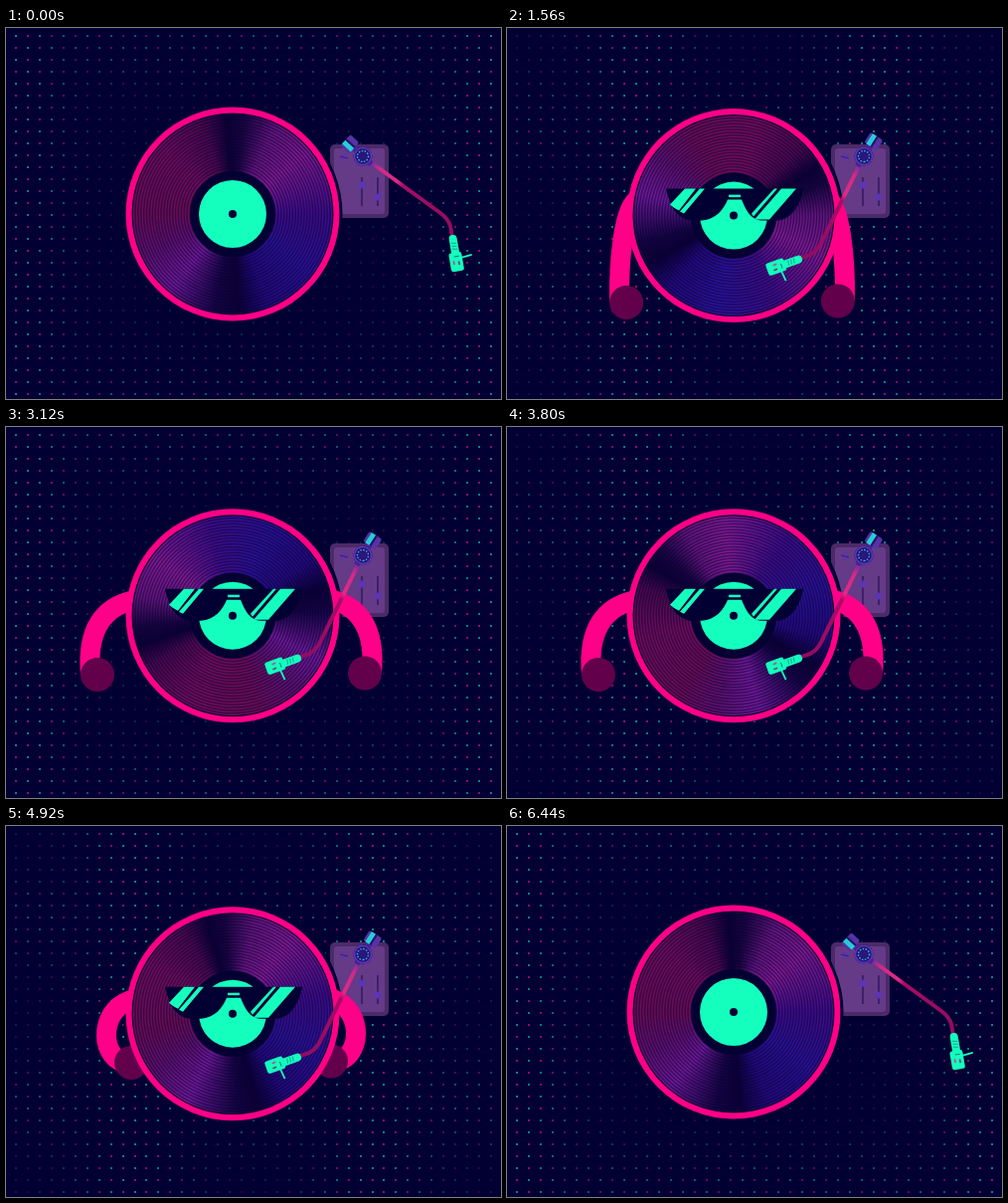
These frames come from a looping animation (498x373 px, 6.48 s). An HTML page with a canvas:

```html
<!DOCTYPE html>
<html lang="en">
<head>
<meta charset="utf-8">
<title>Dancing record</title>
<style>
html, body { margin: 0; width: 100%; height: 100%; overflow: hidden; background: #020033; }
canvas { display: block; width: 498px; height: 373px; }
</style>
</head>
<body>
<canvas id="stage" width="498" height="373"></canvas>
<script>
const c = document.getElementById('stage').getContext('2d');
const LOOP = 6480, TAU = Math.PI * 2;
const NAVY = '#020033', PINK = '#ff0086', MINT = '#14ffbe';
const CX = 228, CY = 187;

const clamp = x => Math.max(0, Math.min(1, x));
const smooth = x => x * x * (3 - 2 * x);
const ramp = (t, a, b) => smooth(clamp((t - a) / (b - a)));
const bell = (x, s) => Math.exp(-x * x / (2 * s * s));

function disc(x, y, r, fill) {
  c.beginPath();
  c.arc(x, y, r, 0, TAU);
  c.fillStyle = fill;
  c.fill();
}
function ring(x, y, r, width, color) {
  c.beginPath();
  c.arc(x, y, r, 0, TAU);
  c.lineWidth = width;
  c.strokeStyle = color;
  c.stroke();
}
function box(x, y, w, h, r, fill) {
  c.beginPath();
  c.roundRect(x, y, w, h, r);
  c.fillStyle = fill;
  c.fill();
}
function line(x1, y1, x2, y2, width, color) {
  c.beginPath();
  c.moveTo(x1, y1);
  c.lineTo(x2, y2);
  c.lineWidth = width;
  c.strokeStyle = color;
  c.stroke();
}
function shape(path, fill) {
  c.fillStyle = fill;
  c.fill(new Path2D(path));
}

// Vinyl sheen, clockwise from the right
const sheen = c.createConicGradient(0, 0, 0);
[[0, '#4a10a0'], [.1, '#3216b0'], [.19, '#280d92'], [.24, '#0c0038'], [.28, '#18054a'],
 [.36, '#8a20b4'], [.43, '#74157f'], [.5, '#84105f'], [.62, '#8a1066'], [.7, '#5a0a55'],
 [.74, '#0c0035'], [.77, '#1c0645'], [.82, '#7a1a90'], [.89, '#a021ac'], [1, '#4a10a0']
].forEach(s => sheen.addColorStop(...s));

// Pose: hand x, y, elbow control x, y, shoulder control x, record drop
const HIDDEN = [170, 240, 150, 215, 150, 0];
const DOWN = [134, 292, 128, 250, 130, 1];
const RISEN = [95, 247, 83, 203, 97, 2.7];
const OUT = [92, 249, 81, 205, 97, 2.7];
const BENT = [126, 238, 92, 230, 95, 1.7];
const KEYS = [[0, HIDDEN], [1200, HIDDEN], [1400, DOWN], [1800, RISEN], [2200, RISEN],
  [2500, OUT], [4600, OUT], [4880, BENT], [5000, BENT], [5360, OUT], [5800, OUT],
  [6160, DOWN], [6400, HIDDEN], [LOOP, HIDDEN]];

function poseAt(t) {
  const i = KEYS.findIndex(k => k[0] > t);
  const [t0, a] = KEYS[i - 1], [t1, b] = KEYS[i];
  const u = ramp(t, t0, t1);
  return a.map((v, n) => v + (b[n] - v) * u);
}

// Light bands rush from the edges to the centre, then drift back
function bandAt(t) {
  if (t < 960 || t > 6000) return 1;
  const u = (t - 960) / 560 % 1;
  return u < .22 ? Math.pow(1 - u / .22, 1.7) : ramp(u, .22, .92);
}

function dots(t) {
  const p = bandAt(t);
  for (let i = 0; i < 41; i++) {
    for (let j = 0; j < 31; j++) {
      const x = Math.round(9 + i * 11.95), y = 7 + j * 12;
      const col = bell(Math.abs(x - 248) - 239 * p, 45);
      const row = bell(Math.abs(y - 187) - 180 * p, 38) * .6;
      c.globalAlpha = .13 + .5 * Math.max(col, row);
      c.fillStyle = (i + j) % 2 ? '#e01a8c' : '#18c8c0';
      c.fillRect(x, y, 2, 2);
    }
  }
  c.globalAlpha = 1;
}

function deck() {
  box(326, 117, 59, 74, 5, '#4b2a68');
  box(330, 121, 51, 66, 3, '#653a87');
  for (const [x, y] of [[358, 158], [374, 170]]) {
    line(x, 150, x, 179, 2, '#3d2068');
    disc(x, y, 3.6, '#5b35b4');
  }
  disc(340, 130, 2.8, '#5b35b4');
  line(336, 129, 344, 131, 1, '#38206f');
  disc(CX, CY, 110.5, NAVY);
}

function limb(pose, mirror) {
  const [hx, hy, ex, ey, sx] = pose;
  c.save();
  if (mirror) {
    c.translate(453, -1.5);
    c.scale(-1, 1);
  }
  c.beginPath();
  c.moveTo(130, 174);
  c.bezierCurveTo(sx, 180, ex, ey, hx - 7, hy);
  c.lineWidth = 20;
  c.strokeStyle = PINK;
  c.stroke();
  disc(hx, hy, 17, '#62004b');
  c.restore();
}

function record(t) {
  const turn = 1 - Math.pow(1 - clamp((t - 1200) / 5200), 2.7);
  disc(0, 0, 107.5, PINK);
  disc(0, 0, 101.5, '#08002f');
  c.save();
  c.rotate(turn * TAU);
  c.globalAlpha = .4;
  disc(0, 0, 100, sheen);
  c.globalAlpha = .65;
  for (let r = 44.5; r < 100; r += 2.9) ring(0, 0, r, 1.4, sheen);
  c.restore();
  disc(0, 0, 43, '#040031');
  disc(0, 0, 34, MINT);
}

function glasses(t) {
  const lift = 230 * (1 - ramp(t, 480, 900) + ramp(t, 5560, 6000));
  c.save();
  c.translate(0, -lift);
  // Coordinates are relative to the record centre
  shape('M-68-27H70C67-10 58 4 44 5H28C16 4 12-7 8-16H-6C-10-6-18 4-32 5H-43C-58 3-64-10-68-27Z', NAVY);
  shape('M-49-27H-38L-55-5Q-61-8-64-11ZM-34-27H-29L-50-2L-54-4Z', MINT);
  shape('M48-27H63L36 4H21ZM41-27H44L20 1L18-2Z', MINT);
  shape('M-5-21H7V-18.5H-5Z', MINT);
  c.restore();
}

function tonearm(t) {
  const turn = 80 * (ramp(t, 0, 840) - ramp(t, 5300, 6120));
  c.save();
  c.translate(359, 129);
  c.rotate(turn * Math.PI / 180);

  const tint = c.createLinearGradient(8, 6, 90, 80);
  tint.addColorStop(0, '#7a2aa0');
  tint.addColorStop(.1, '#d02a88');
  tint.addColorStop(.3, '#e02a86');
  tint.addColorStop(.36, '#a80c66');
  tint.addColorStop(1, '#8f0c60');
  c.lineWidth = 4;
  c.strokeStyle = tint;
  c.stroke(new Path2D('M6 4.5L78 57Q86 63 88 70L90 82'));

  // Counterweight, striped along its axis
  c.save();
  c.rotate(.75);
  box(-14, -3, 26, 6, 2, '#47239a');
  box(-24, -7.5, 12, 15, 2, '#5632a6');
  box(-24, 0, 12, 5, 0, '#22cfd8');
  box(-24, -2, 12, 2, 0, '#251064');
  c.restore();

  // Pivot
  disc(0, 0, 9.5, '#2a126f');
  ring(0, 0, 8.5, 1.6, '#5a35c0');
  c.setLineDash([1.5, 1.5]);
  ring(0, 0, 5.5, 1.4, '#27b7dc');
  c.setLineDash([]);
  disc(0, 0, 4, '#2b1580');

  // Cartridge
  c.translate(90, 79);
  c.rotate(-.17);
  box(-4, 0, 8, 22, 4, MINT);
  for (let y = 8; y < 17; y += 3) line(-2.5, y, 2.5, y + 1, .8, '#0b9a91');
  box(-7, 18, 13, 19, 2.5, MINT);
  line(5, 24, 16, 23, 1.8, MINT);
  line(-3, 26, -3, 30, 1.6, '#c04a8c');
  line(2, 27, 2, 31, 1.6, '#7a3a80');
  line(-2, 22, 3, 22, 1, '#0b7b86');
  c.restore();
}

function draw(t) {
  c.fillStyle = NAVY;
  c.fillRect(0, 0, 498, 373);
  dots(t);
  deck();
  const pose = poseAt(t);
  if (t > 1200 && t < 6400) {
    limb(pose, false);
    limb(pose, true);
  }
  c.save();
  c.translate(CX, CY + pose[5]);
  record(t);
  glasses(t);
  disc(0, 0, 4, NAVY);
  c.restore();
  tonearm(t);
}

const start = performance.now();
function tick() {
  draw((performance.now() - start) % LOOP);
  requestAnimationFrame(tick);
}
tick();
</script>
</body>
</html>
```
